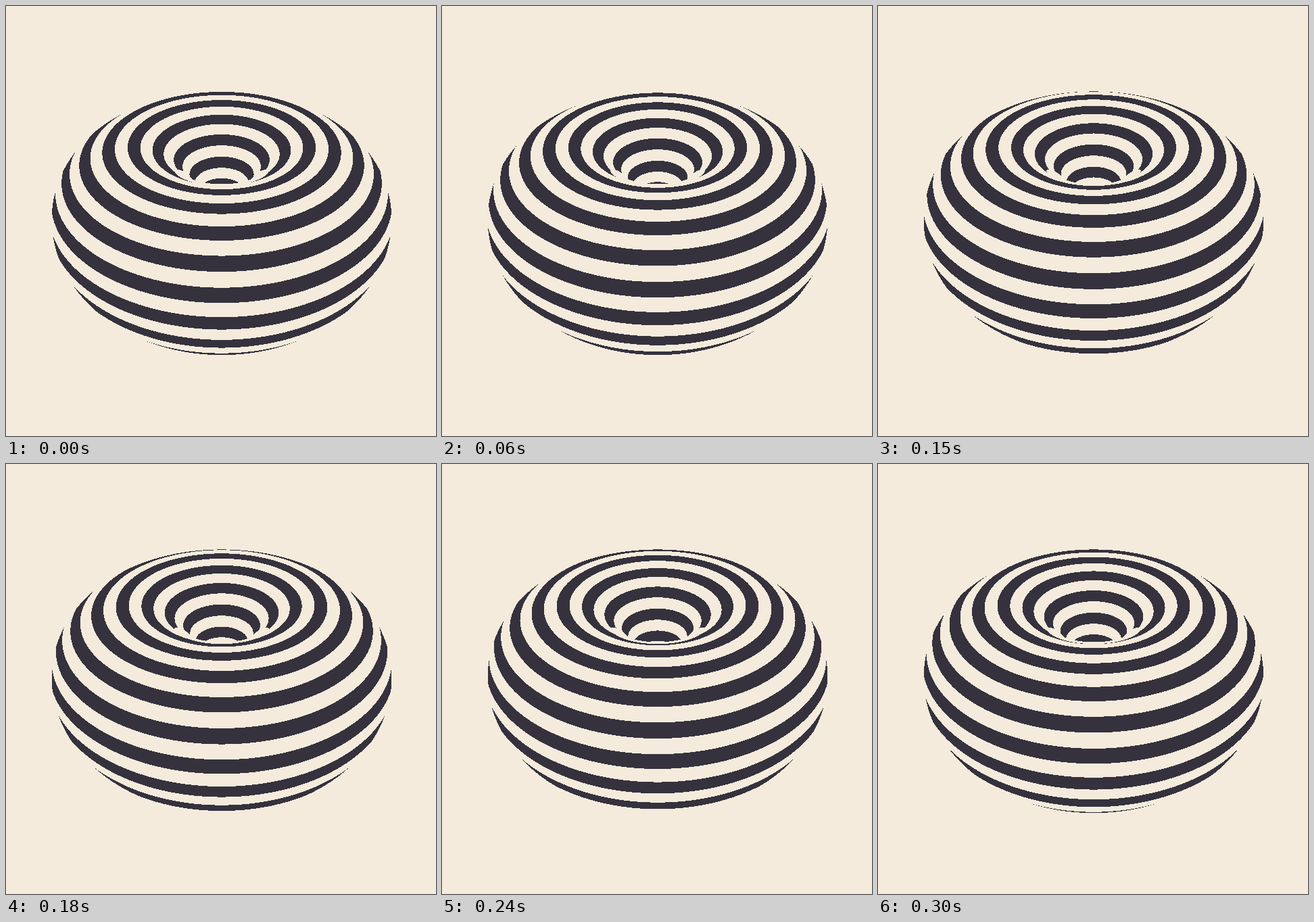
Write an HTML page with a canvas that moves like this. It is 636 px wide and 636 px high and loops after 0.33 s.

```html
<!DOCTYPE html>
<html lang="en">
<head>
<meta charset="utf-8">
<title>Rolling striped torus</title>
<style>
  html, body { margin: 0; height: 100%; overflow: hidden; background: #f4ebdc; }
  canvas { display: block; }
</style>
</head>
<body>
<canvas id="stage" width="636" height="636"></canvas>
<script>
const SIZE = 636, STEPS = 11, STEP_MS = 30, STRIPES = 20;
const DARK = 0xff3e3235;                      // ABGR
const RING = 1.3;                             // ring radius, tube radius is 1
const DISTANCE = 7, FOCAL = 743, CENTER_X = 319, CENTER_Y = 291.3;
const SIN = 0.6, COS = 0.8;                   // camera elevation
const RIM = 0.2;                              // surfaces turned further away stay light
const PHASE = 222 * Math.PI / 180;

const ctx = document.getElementById('stage').getContext('2d');
const image = ctx.createImageData(SIZE, SIZE);
const pixels = new Uint32Array(image.data.buffer);

// Angle around the tube where the ray through a pixel hits the torus,
// or null when it misses or only grazes the rim.
function tubeAngle(x, y) {
  const dx = (x - CENTER_X) / FOCAL, dy = (CENTER_Y - y) / FOCAL;
  const length = Math.hypot(dx, dy, 1);
  const rise = dy * COS - SIN, ahead = -COS - dy * SIN;
  let travel = DISTANCE - 2.4;
  for (let i = 0; i < 90 && travel < DISTANCE + 3; i++) {
    const scale = travel / length;
    const side = dx * scale;
    const height = DISTANCE * SIN + rise * scale;
    const front = DISTANCE * COS + ahead * scale;
    const axis = Math.sqrt(side * side + front * front);
    const radial = axis - RING;
    const gap = Math.sqrt(radial * radial + height * height) - 1;
    if (gap < 0.0005) {
      const outward = (side * dx + front * ahead) / axis;
      const facing = -(radial * outward + height * rise) / length;
      return facing > RIM ? Math.atan2(height, radial) : null;
    }
    travel += gap;
  }
  return null;
}

// Stripe phase of every visible surface pixel, traced once.
const surface = [];
for (let y = 120; y < 521; y++) {
  for (let x = 60; x < 579; x++) {
    const angle = tubeAngle(x + 0.5, y + 0.5);
    if (angle !== null) surface.push([y * SIZE + x, angle * STRIPES - PHASE]);
  }
}

let shown = -1;
function draw() {
  const step = Math.floor(performance.now() / STEP_MS) % STEPS;
  if (step !== shown) {
    shown = step;
    const roll = 2 * Math.PI * step / STEPS;
    for (const [index, phase] of surface) {
      pixels[index] = Math.cos(phase - roll) > 0 ? DARK : 0;
    }
    ctx.putImageData(image, 0, 0);
  }
  requestAnimationFrame(draw);
}
draw();
</script>
</body>
</html>
```
